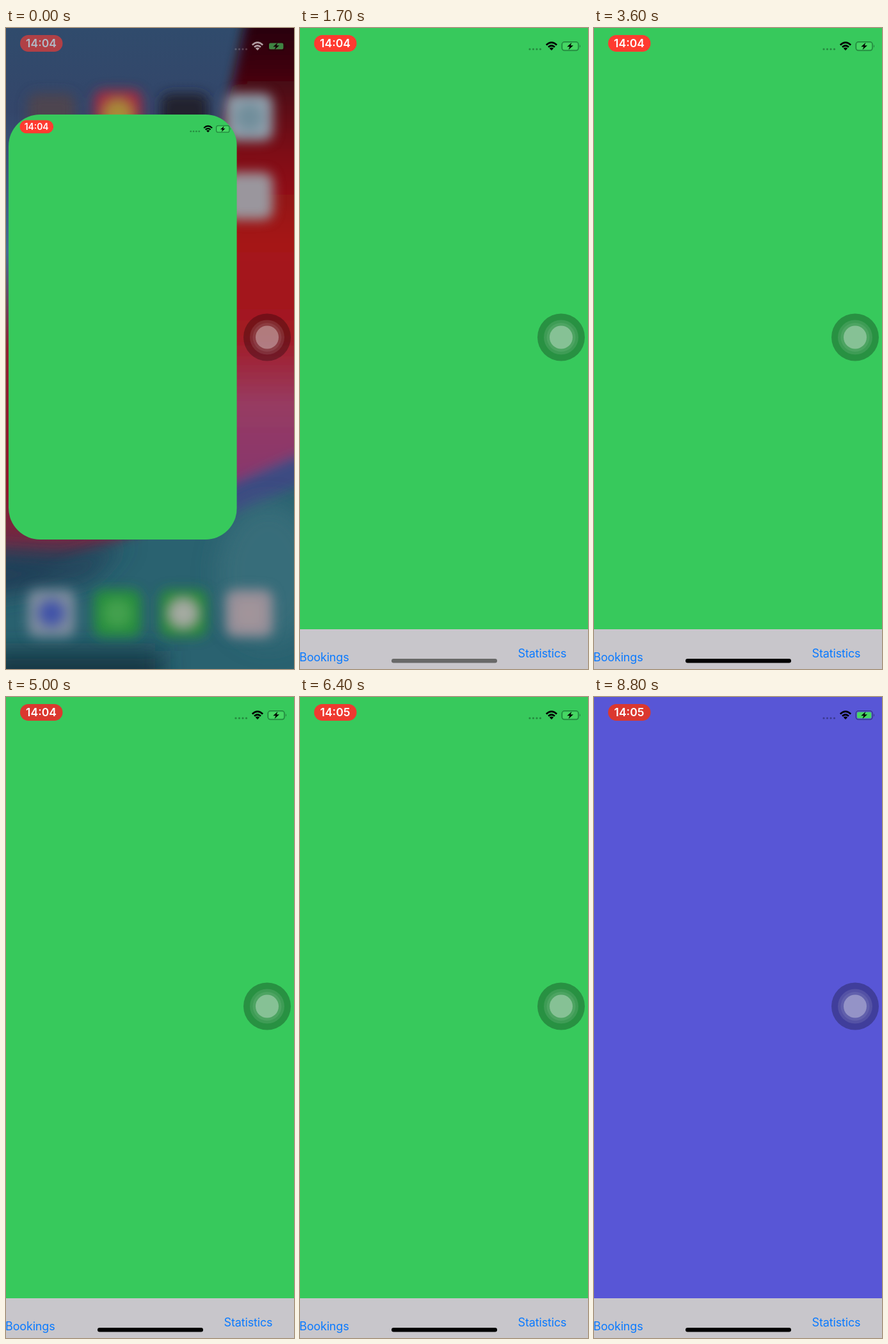
An HTML page that plays this animation: 450x1000 px, repeating every 8.9 s.

```html
<!DOCTYPE html>
<html lang="en">
<head>
<meta charset="utf-8">
<title>Phone app launch</title>
<style>
  html, body { margin: 0; width: 100%; height: 100%; overflow: hidden; background: #37c95c; }
  #stage { position: relative; width: 450px; height: 1000px; overflow: hidden; font-family: Inter, "Liberation Sans", sans-serif; }
  #stage > * { position: absolute; left: 0; top: 0; width: 450px; height: 1000px; }
  #app { transform-origin: 0 0; }
  svg { display: block; }
  .clock { font-size: 17.5px; font-weight: 600; text-anchor: middle; fill: #fff; }
  .tab { font-size: 18px; letter-spacing: -.15px; fill: #0a7aff; }
</style>
</head>
<body>
<div id="stage">
  <svg id="home" viewBox="0 0 450 1000">
    <defs>
      <linearGradient id="sky" x2="0" y2="1">
        <stop offset="0" stop-color="#304b6c"/>
        <stop offset=".13" stop-color="#34466a"/>
        <stop offset=".35" stop-color="#456e92"/>
        <stop offset=".5" stop-color="#8c2230"/>
        <stop offset=".72" stop-color="#8d1729"/>
        <stop offset=".8" stop-color="#702b45"/>
        <stop offset=".84" stop-color="#20445a"/>
        <stop offset="1" stop-color="#1d4552"/>
      </linearGradient>
      <linearGradient id="reds" x2="0" y2="1">
        <stop offset="0" stop-color="#20040c"/>
        <stop offset=".12" stop-color="#3c0510"/>
        <stop offset=".3" stop-color="#7e0d18"/>
        <stop offset=".48" stop-color="#a51618"/>
        <stop offset=".68" stop-color="#a21a22"/>
        <stop offset=".82" stop-color="#973b62"/>
        <stop offset="1" stop-color="#85356f"/>
      </linearGradient>
      <filter id="soft" x="-50%" y="-50%" width="200%" height="200%"><feGaussianBlur stdDeviation="9"/></filter>
      <filter id="wide" x="-50%" y="-50%" width="200%" height="200%"><feGaussianBlur stdDeviation="18"/></filter>
    </defs>
    <rect width="450" height="1000" fill="url(#sky)"/>
    <g filter="url(#soft)">
      <path d="M378-30H490V720H330V200Z" fill="url(#reds)"/>
      <path d="M490 650L340 715L200 790L60 850L-40 880V1040H490Z" fill="#2c6270"/>
      <path d="M490 650L340 715L260 760L330 770L490 700Z" fill="#3c4c82"/>
    </g>
    <g filter="url(#wide)">
      <path d="M-40 820L90 830L190 800L130 860L-40 890Z" fill="#233f59"/>
      <ellipse cx="410" cy="850" rx="80" ry="110" fill="#427681" opacity=".6"/>
      <path d="M-30 972H245V1040H-30Z" fill="#153744"/>
    </g>
    <g id="icons" filter="url(#soft)"></g>
    <g opacity=".62"><g id="homeStatus"></g></g>
  </svg>

  <div id="app">
    <svg viewBox="0 0 450 1000">
      <rect id="page" width="450" height="1000"/>
      <g id="appStatus"></g>
      <rect y="938" width="450" height="62" fill="#c8c6cb"/>
      <text class="tab" x="-1" y="988">Bookings</text>
      <text class="tab" x="340.5" y="982">Statistics</text>
      <rect id="bar" x="143" y="984" width="165" height="6.5" rx="3.2"/>
    </svg>
  </div>

  <svg id="cover" viewBox="0 0 450 1000">
    <defs>
      <linearGradient id="leaf" gradientUnits="userSpaceOnUse" x1="40" y1="800" x2="400" y2="1010">
        <stop offset="0" stop-color="#41a81d"/>
        <stop offset=".4" stop-color="#2cb32a"/>
        <stop offset=".72" stop-color="#1fbd46"/>
        <stop offset=".86" stop-color="#0acf4a"/>
        <stop offset="1" stop-color="#00e14c"/>
      </linearGradient>
      <radialGradient id="glow">
        <stop offset="0" stop-color="#8e6820"/>
        <stop offset=".4" stop-color="#856c20" stop-opacity=".85"/>
        <stop offset="1" stop-color="#4ba01d" stop-opacity="0"/>
      </radialGradient>
    </defs>
    <rect width="450" height="1000" fill="url(#leaf)"/>
    <circle cx="54" cy="842" r="66" fill="url(#glow)"/>
    <g fill="#000" fill-opacity=".27">
      <circle cx="82" cy="906.5" r="31"/>
      <circle cx="368.5" cy="906.5" r="31"/>
    </g>
    <g fill="#fff">
      <path d="M75.5 892h13v2.5h-13ZM75.5 896h13q0 5-3.3 8v18q0 2-2 2h-2.4q-2 0-2-2v-18q-3.3-3-3.3-8Z"/>
      <path d="M358 899h5l2-3h8l2 3h5q3 0 3 3v12q0 3-3 3h-22q-3 0-3-3v-12q0-3 3-3ZM357 897h4v1.5h-4Z"/>
    </g>
    <rect x="80.8" y="905" width="2.4" height="6" rx="1.2" fill="#297d11"/>
    <circle cx="369" cy="907.5" r="6" fill="none" stroke="#199a36" stroke-width="1.6"/>
    <circle cx="377" cy="903" r="1" fill="#199a36"/>
  </svg>

  <svg id="touch" viewBox="0 0 450 1000">
    <circle cx="408" cy="482.5" r="37" fill="#000" fill-opacity=".28"/>
    <g fill="#fff">
      <circle cx="408" cy="482.5" r="27" fill-opacity=".1"/>
      <circle cx="408" cy="482.5" r="22.5" fill-opacity=".08"/>
      <circle cx="408" cy="482.5" r="18" fill-opacity=".32"/>
    </g>
  </svg>
</div>

<script>
const LOOP = 8900, STEP = 100;
const $ = id => document.getElementById(id);
const clamp = v => Math.min(1, Math.max(0, v));
const mix = (a, b, p) => a + (b - a) * p;

function statusBar(ink) {
  const dots = [359, 364.5, 370, 375.5]
    .map(x => `<circle cx="${x}" cy="33" r="1.6" fill="${ink}" fill-opacity=".32"/>`).join('');
  return `<rect class="pill" x="22" y="11" width="66.5" height="26" rx="13"/>
    <text class="clock" x="55" y="30">14:04</text>${dots}
    <g fill="none" stroke="${ink}" stroke-width="2.7">
      <path d="M384.8 26.4Q393 18.8 401.2 26.4M388 29.8Q393 25.2 398 29.8"/>
    </g>
    <path d="M389.8 31.8Q393 29.2 396.2 31.8L393 35Z" fill="${ink}"/>
    <rect x="409.2" y="21.7" width="26" height="13.4" rx="4" fill="none" stroke="#000" stroke-opacity=".4" stroke-width="1.3"/>
    <rect x="411" y="23.5" width="22.4" height="9.8" rx="2.3" fill="#47d663"/>
    <path d="M437 26q2 2.4 0 4.8Z" fill="#000" fill-opacity=".4"/>
    <path d="M424.5 22.8L417.3 29.3H421.4L419.6 34L427 27.3H422.8Z" fill="#000"/>`;
}

function icon(x, y, fill, core) {
  return `<rect x="${x - 37}" y="${y - 37}" width="74" height="74" rx="15" fill="${fill}"/>` +
    (core ? `<circle cx="${x}" cy="${y}" r="22" fill="${core}"/>` : '');
}

$('homeStatus').innerHTML = statusBar('#fff');
$('appStatus').innerHTML = statusBar('#000');
$('icons').innerHTML = [
  [71, 139, '#4d454f'], [175, 134, '#a32c43', '#a78b37'], [279, 139, '#20232f'],
  [380, 139, '#8e9fab', '#718e9b'], [380, 262, '#9a969d'],
  [71, 913, '#7d8b9d', '#4254a8'], [174, 913, '#288f3e', '#43a04e'],
  [277, 913, '#2b8b3c', '#a5aaa2'], [380, 913, '#978f99', '#a2949a']
].map(a => icon(...a)).join('');

const pills = document.querySelectorAll('.pill');
const clocks = document.querySelectorAll('.clock');

// [time, visible height of the pulled-down sheet]
const pull = [
  [2800, 0], [3000, 170], [3200, 260], [3500, 0],
  [5150, 0], [5400, 200], [5700, 260], [6100, 0]
];

function pullAt(t) {
  const i = pull.findIndex(k => k[0] > t);
  if (i < 1) return 0;
  const [t0, a] = pull[i - 1], [t1, b] = pull[i];
  return mix(a, b, (t - t0) / (t1 - t0));
}

function pillColor(t) {
  const wave = (1 - Math.cos((t - 4900) / 1900 * 2 * Math.PI)) / 2;
  const p = clamp(wave * 1.5);
  return `rgb(${mix(217, 255, p)},${mix(56, 59, p)},${mix(47, 48, p)})`;
}

function draw(t) {
  const open = 1 - (1 - clamp(t / 450)) ** 3;
  const rest = 1 - open;
  $('app').style.transform =
    `translate(${4 * rest}px,${135 * rest}px) scale(${mix(.793, 1, open)})`;
  $('app').style.clipPath = `inset(0 0 ${164 * rest}px 0 round ${62 * rest}px)`;
  $('home').style.visibility = open < 1 ? 'visible' : 'hidden';

  $('page').setAttribute('fill', t < 7400 ? '#37c95c' : '#5856d6');
  const gray = mix(104, 0, clamp((t - 1700) / 500));
  $('bar').setAttribute('fill', `rgb(${gray},${gray},${gray})`);

  const color = pillColor(t), time = t < 5700 ? '14:04' : '14:05';
  pills.forEach(p => p.setAttribute('fill', color));
  clocks.forEach(c => c.textContent = time);

  const shown = pullAt(t);
  $('cover').style.visibility = shown > 0 ? 'visible' : 'hidden';
  $('cover').style.transform = `translateY(${shown - 1000}px)`;
}

const start = performance.now();
function tick() {
  const t = (performance.now() - start) % LOOP;
  draw(Math.floor(t / STEP) * STEP);
  requestAnimationFrame(tick);
}
draw(0);
requestAnimationFrame(tick);
</script>
</body>
</html>
```
